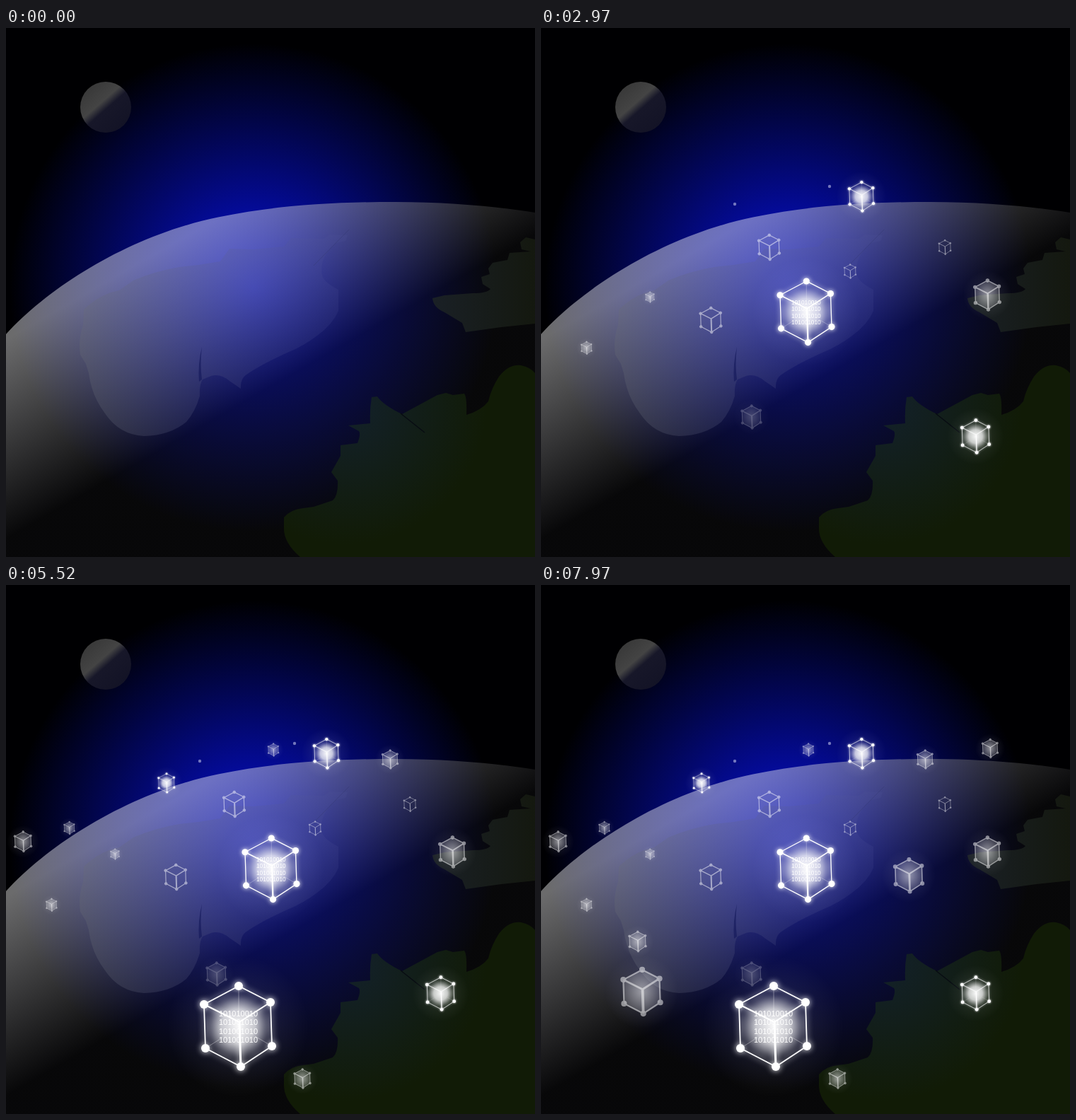
These frames come from a looping animation (748x748 px, 8 s). An HTML page without scripts:

```html
<!DOCTYPE html>
<html lang="en">
<head>
<meta charset="utf-8">
<title>Data cubes around a planet</title>
<style>
html, body { margin: 0; width: 100%; height: 100%; overflow: hidden; background: #000; }
svg { display: block; width: 100%; height: 100%; }
.edge { fill: none; stroke: #fff; stroke-linejoin: round; }
.lit { filter: drop-shadow(0 0 4px #fff); }
.code { font: 11px "Liberation Sans", Arial, sans-serif; fill: #fff; }
.step { opacity: 0; }
</style>
</head>
<body>
<svg viewBox="0 0 748 748">
<defs>
  <radialGradient id="sky" gradientUnits="userSpaceOnUse" cx="350" cy="367" r="345">
    <stop offset="0" stop-color="#0610dc"/><stop offset="1" stop-color="#000002"/>
  </radialGradient>
  <linearGradient id="day" gradientUnits="userSpaceOnUse" x1="190" y1="331" x2="312" y2="543">
    <stop offset="0" stop-color="#fff"/><stop offset="1" stop-color="#121212"/>
  </linearGradient>
  <linearGradient id="moon" x1=".15" y1=".1" x2=".85" y2=".9">
    <stop offset="0" stop-color="#383838"/><stop offset=".38" stop-color="#444"/>
    <stop offset=".53" stop-color="#171729"/><stop offset="1" stop-color="#131326"/>
  </linearGradient>
  <linearGradient id="west" gradientUnits="userSpaceOnUse" x1="104" y1="0" x2="470" y2="0">
    <stop offset="0" stop-color="#686c74" stop-opacity=".3"/>
    <stop offset="1" stop-color="#50549a" stop-opacity=".16"/>
  </linearGradient>
  <linearGradient id="east">
    <stop offset="0" stop-color="#1a2026"/><stop offset="1" stop-color="#14180f"/>
  </linearGradient>
  <radialGradient id="south" gradientUnits="userSpaceOnUse" cx="480" cy="530" r="200">
    <stop offset="0" stop-color="#13212c"/><stop offset="1" stop-color="#111b06"/>
  </radialGradient>
  <radialGradient id="core">
    <stop offset="0" stop-color="#fff" stop-opacity=".95"/>
    <stop offset=".5" stop-color="#fff" stop-opacity=".75"/>
    <stop offset="1" stop-color="#fff" stop-opacity="0"/>
  </radialGradient>
  <radialGradient id="halo">
    <stop offset="0" stop-color="#fff" stop-opacity=".14"/>
    <stop offset=".5" stop-color="#fff" stop-opacity=".06"/>
    <stop offset="1" stop-color="#fff" stop-opacity="0"/>
  </radialGradient>
  <radialGradient id="haze">
    <stop offset="0" stop-color="#fff" stop-opacity=".48"/>
    <stop offset="1" stop-color="#fff" stop-opacity=".16"/>
  </radialGradient>

  <!-- Cube parts, drawn around 0,0 at the size of the largest cube -->
  <path id="hex" d="M1-57 46-34 48 28 4 57-46 31-48-31Z"/>
  <path id="arms" d="M-48-31 2-6 46-34"/>
  <path id="stem" d="M2-6 4 57"/>
  <g id="nodes">
    <circle cx="1" cy="-57" r="6"/><circle cx="46" cy="-34" r="6"/><circle cx="48" cy="28" r="6"/>
    <circle cx="4" cy="57" r="6"/><circle cx="-46" cy="31" r="6"/><circle cx="-48" cy="-31" r="6"/>
  </g>

  <g id="bright">
    <circle r="100" fill="url(#halo)"/>
    <circle r="48" fill="url(#core)"/>
    <path class="edge" d="M1-57 1-14M-46 31-22 16M48 28 24 14" stroke-width="1" opacity=".35"/>
    <g class="lit">
      <use href="#hex" class="edge" stroke-width="1.8"/>
      <use href="#arms" class="edge" stroke-width="2"/>
      <use href="#stem" class="edge" stroke-width="3"/>
      <use href="#nodes" fill="#fff"/>
    </g>
  </g>
  <g id="data">
    <use href="#bright"/>
    <g class="code">
      <text x="-27" y="-14">101010010</text><text x="-27" y="-2">101001010</text>
      <text x="-27" y="11">101001010</text><text x="-27" y="23">101001010</text>
    </g>
  </g>
  <g id="wire" opacity=".5">
    <use href="#hex" class="edge" stroke-width="4"/>
    <use href="#arms" class="edge" stroke-width="5"/>
    <use href="#stem" class="edge" stroke-width="7"/>
    <use href="#nodes" fill="#fff" stroke="#fff" stroke-width="3"/>
  </g>
  <g id="dim">
    <circle r="95" fill="url(#halo)"/>
    <use href="#hex" fill="url(#haze)"/>
    <use href="#wire"/>
  </g>
</defs>

<rect width="748" height="748" fill="#000002"/>
<circle cx="350" cy="367" r="345" fill="url(#sky)"/>
<circle cx="141" cy="112" r="36" fill="url(#moon)"/>
<path d="M0 433C65 362 180 292 300 267.5 380 251 460 246 550 246 625 246 690 252 748 261V748H0Z" fill="url(#day)" opacity=".42"/>

<path fill="url(#west)" d="M110 398Q128 381 148 374L160 371 180 357Q210 344 245 338L272 335 303 330 316 312 350 313 393 309 403 297 450 298 458 292 483 293 480 301 466 304Q442 325 447 350 450 360 470 370L470 400Q462 419 440 435 420 450 400 458 362 475 340 490 331 496 332 510L316 499Q303 488 290 492L278 497Q273 505 274 520 268 542 255 557 232 576 195 577 160 575 140 545 121 520 117 488L113 475 105 462Q102 440 109 420Z"/>
<path fill="#14185a" opacity=".65" d="M277 451Q271 475 273 500L277 497Q274 475 277 451Z"/>
<path fill="none" stroke="#34386e" opacity=".4" d="M485 285 435 336"/>
<path fill="url(#east)" d="M748 299 735 296 727 303 729 313 742 316 712 318 709 328 688 332 682 340 684 348 672 352 674 362 685 369Q680 375 660 375L620 378 603 382Q604 395 620 402L645 417 650 430 700 423 748 418Z"/>
<path fill="url(#south)" d="M416 748Q393 728 393 708V692Q402 681 420 679L435 677 462 668Q470 661 469 640L460 628 473 605V590L497 587Q502 574 499 570L484 562 515 559Q514 540 517 522L525 521Q533 533 560 546L610 519 622 516 632 519 648 517Q652 522 651 547 672 541 682 528 686 510 697 493 711 475 728 477 742 480 748 488V748Z"/>
<path fill="none" stroke="#080c12" stroke-width="1.5" d="M558 545 592 572"/>

<g class="step"><animate attributeName="opacity" values="0;1" keyTimes="0;.02875" calcMode="discrete" dur="8s" repeatCount="indefinite"/>
  <use href="#bright" transform="translate(453 238.3) scale(.355)"/>
  <circle cx="408" cy="224" r="2.2" fill="#a4a6d8" opacity=".7"/>
</g>
<g class="step"><animate attributeName="opacity" values="0;1" keyTimes="0;.045" calcMode="discrete" dur="8s" repeatCount="indefinite"/>
  <use href="#wire" transform="translate(240 413) scale(.3)"/>
</g>
<g class="step"><animate attributeName="opacity" values="0;1" keyTimes="0;.0825" calcMode="discrete" dur="8s" repeatCount="indefinite"/>
  <use href="#dim" transform="translate(154 380.5) scale(.125)"/>
  <circle cx="274" cy="249" r="2.2" fill="#a4a6d8" opacity=".7"/>
</g>
<g class="step"><animate attributeName="opacity" values="0;1" keyTimes="0;.14125" calcMode="discrete" dur="8s" repeatCount="indefinite"/>
  <use href="#wire" transform="translate(437 344) scale(.165)"/>
</g>
<g class="step"><animate attributeName="opacity" values="0;1" keyTimes="0;.1625" calcMode="discrete" dur="8s" repeatCount="indefinite"/>
  <use href="#dim" transform="translate(631 377.5) scale(.36)"/>
</g>
<g class="step"><animate attributeName="opacity" values="0;1" keyTimes="0;.18375" calcMode="discrete" dur="8s" repeatCount="indefinite"/>
  <use href="#dim" transform="translate(64.3 452.3) scale(.15)"/>
</g>
<g class="step"><animate attributeName="opacity" values="0;1" keyTimes="0;.1925" calcMode="discrete" dur="8s" repeatCount="indefinite"/>
  <use href="#wire" transform="translate(571 310) scale(.17)"/>
</g>
<g class="step"><animate attributeName="opacity" values="0;1" keyTimes="0;.2175" calcMode="discrete" dur="8s" repeatCount="indefinite"/>
  <use href="#bright" transform="translate(614.5 577.5) scale(.4)"/>
</g>
<g class="step"><animate attributeName="opacity" values="0;1" keyTimes="0;.27125" calcMode="discrete" dur="8s" repeatCount="indefinite"/>
  <use href="#dim" transform="translate(297.5 550) scale(.275)" opacity=".45"/>
</g>
<g class="step"><animate attributeName="opacity" values="0;1" keyTimes="0;.37125" calcMode="discrete" dur="8s" repeatCount="indefinite"/>
  <use href="#wire" transform="translate(322.5 310) scale(.3)"/>
  <use href="#data" transform="translate(374.5 401.3) scale(.76)"/>
</g>
<g class="step"><animate attributeName="opacity" values="0;1" keyTimes="0;.4125" calcMode="discrete" dur="8s" repeatCount="indefinite"/>
  <use href="#dim" transform="translate(24 362.7) scale(.24)"/>
</g>
<g class="step"><animate attributeName="opacity" values="0;1" keyTimes="0;.44125" calcMode="discrete" dur="8s" repeatCount="indefinite"/>
  <use href="#bright" transform="translate(226.8 280) scale(.23)"/>
  <use href="#dim" transform="translate(378 233) scale(.15)"/>
</g>
<g class="step"><animate attributeName="opacity" values="0;1" keyTimes="0;.50375" calcMode="discrete" dur="8s" repeatCount="indefinite"/>
  <use href="#dim" transform="translate(89.5 343.5) scale(.15)"/>
  <use href="#dim" transform="translate(419 698) scale(.23)"/>
</g>
<g class="step"><animate attributeName="opacity" values="0;1" keyTimes="0;.62" calcMode="discrete" dur="8s" repeatCount="indefinite"/>
  <use href="#dim" transform="translate(543 246.5) scale(.22)"/>
</g>
<g class="step"><animate attributeName="opacity" values="0;1" keyTimes="0;.69" calcMode="discrete" dur="8s" repeatCount="indefinite"/>
  <use href="#data" transform="translate(328 624)"/>
</g>
<g class="step"><animate attributeName="opacity" values="0;1" keyTimes="0;.765" calcMode="discrete" dur="8s" repeatCount="indefinite"/>
  <use href="#dim" transform="translate(142.5 575) scale(.545)"/>
</g>
<g class="step"><animate attributeName="opacity" values="0;1" keyTimes="0;.82375" calcMode="discrete" dur="8s" repeatCount="indefinite"/>
  <use href="#dim" transform="translate(136.5 504) scale(.24)"/>
</g>
<g class="step"><animate attributeName="opacity" values="0;1" keyTimes="0;.86125" calcMode="discrete" dur="8s" repeatCount="indefinite"/>
  <use href="#dim" transform="translate(635 231) scale(.22)"/>
</g>
<g class="step"><animate attributeName="opacity" values="0;1" keyTimes="0;.97" calcMode="discrete" dur="8s" repeatCount="indefinite"/>
  <use href="#dim" transform="translate(520 410.7) scale(.4)"/>
</g>
</svg>
</body>
</html>
```
